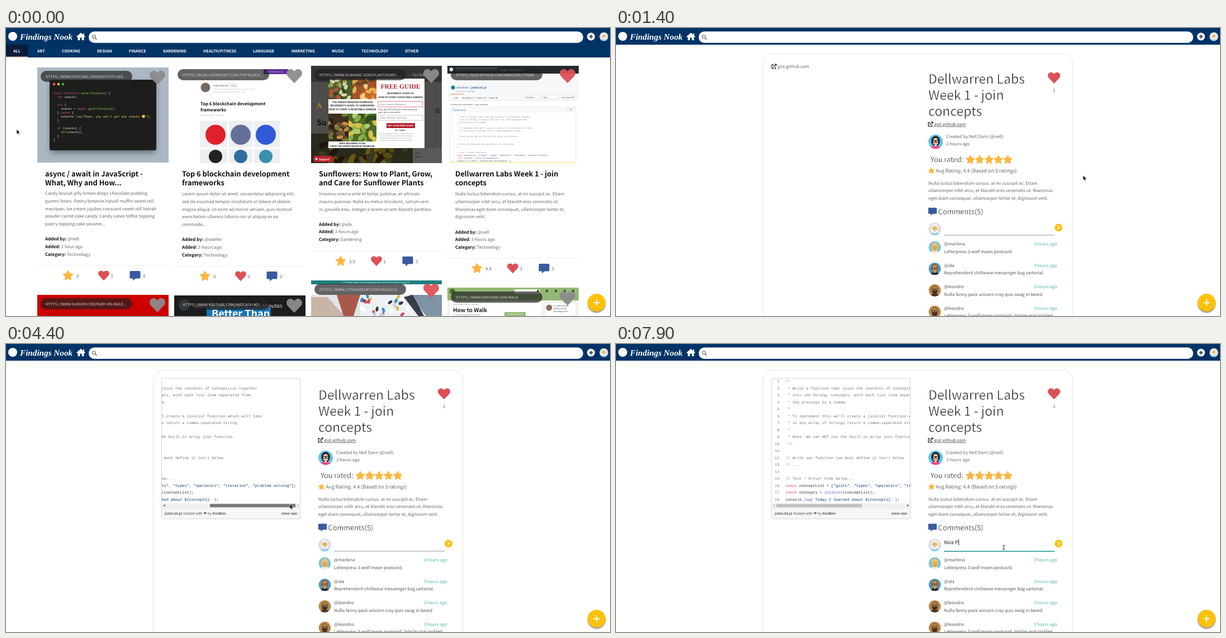
Write an HTML page that moves like this. It is 1081 by 518 pixels and loops after 8 s.

```html
<!DOCTYPE html>
<html lang="en">
<head>
<meta charset="utf-8">
<title>Findings Nook</title>
<style>
  html, body { margin: 0; width: 100%; height: 100%; overflow: hidden; background: #fff; }
  #stage { display: block; width: 100%; height: 100%; }
  text { font-family: "Noto Sans CJK JP", "Noto Sans CJK SC", "Noto Sans CJK", sans-serif;
         white-space: pre; text-rendering: geometricPrecision; }
  .mono { font-family: "Liberation Mono", monospace; }
  .sans { font-family: "Liberation Sans", sans-serif; }
  .serif { font-family: "Liberation Serif", serif; }
  .b { font-weight: 700; }
  .mid { text-anchor: middle; }
  .end { text-anchor: end; }
  .raised { filter: drop-shadow(0 2px .8px #0007); }
</style>
</head>
<body>
<svg id="stage" viewBox="0 0 1081 518"></svg>
<script>
const RED = '#dc5055', STAR = '#fdb63f', BLUE = '#3a5a9f', NAVY = '#003366', YELLOW = '#ffc107', SOFT = '#666';

// Drawing helpers; each returns SVG markup.
const rect = (x, y, w, h, fill, more = '') =>
  `<rect x="${x}" y="${y}" width="${w}" height="${h}" fill="${fill}" ${more}/>`;
const circle = (x, y, r, fill, more = '') => `<circle cx="${x}" cy="${y}" r="${r}" fill="${fill}" ${more}/>`;
const path = (d, fill, more = '') => `<path d="${d}" fill="${fill}" ${more}/>`;
const line = (d, color, width = 1) => path(d, 'none', `stroke="${color}" stroke-width="${width}"`);
const text = (x, y, s, size = 7.8, fill = SOFT, more = '') =>
  `<text x="${x}" y="${y}" font-size="${size}" fill="${fill}" ${more}>${s}</text>`;
const lines = (x, y, pitch, rows, ...style) => rows.map((s, i) => text(x, y + i * pitch, s, ...style)).join('');
const tint = (color, s) => `<tspan fill="${color}">${s}</tspan>`;
const group = (id, inner, more = '') => `<g id="${id}" ${more}>${inner}</g>`;
// A white outline over the glyphs thins the regular weight.
const thin = width => `stroke="#fff" stroke-width="${width}"`;

// A clipped box of scattered ovals, standing in for a busy photograph.
function scatter(x, y, w, h, [ground, ...colors], count, size) {
  let seed = x * 7 + y;
  const random = () => (seed = (seed * 16807 + 11) % 2147483647) / 2147483647;
  random();
  const ovals = Array.from({ length: count }, (_, i) => {
    const cx = (random() * w).toFixed(1), cy = (random() * h).toFixed(1), turn = Math.round(random() * 180);
    return `<ellipse rx="${size}" ry="${size * .55}" fill="${colors[i % colors.length]}" transform="translate(${cx} ${cy}) rotate(${turn})"/>`;
  });
  return `<svg x="${x}" y="${y}" width="${w}" height="${h}">${rect(0, 0, w, h, ground)}${ovals.join('')}</svg>`;
}

const heart = (x, y, r, fill, more = '') => path(
  'M0 .9L-.88-.02C-1.2-.42-.95-.95-.5-.95C-.25-.95-.1-.82 0-.66C.1-.82.25-.95.5-.95C.95-.95 1.2-.42.88-.02Z',
  fill, `transform="translate(${x} ${y}) scale(${r})" ${more}`);
const star = (x, y, r) => {
  const points = Array.from({ length: 10 }, (_, i) => {
    const a = i * Math.PI / 5, d = i % 2 ? r * .5 : r;
    return `${(x + d * Math.sin(a)).toFixed(2)},${(y - d * Math.cos(a)).toFixed(2)}`;
  });
  return `<polygon points="${points}" fill="${STAR}" stroke="${STAR}" stroke-width="${r / 6}" stroke-linejoin="round"/>`;
};
const bubble = (x, y, s) => path(
  'M-8-8.5H8Q9.5-8.5 9.5-7V3.5Q9.5 5 8 5H1L-4 9V5H-8Q-9.5 5-9.5 3.5V-7Q-9.5-8.5-8-8.5Z',
  BLUE, `transform="translate(${x} ${y}) scale(${s})"`);
const linkIcon = (x, y) =>
  line(`M${x + 4} ${y - 2.8}H${x + .6}V${y + 4}H${x + 7}V${y + 1}M${x + 3} ${y + 1.5}L${x + 8} ${y - 3.6}`, '#111', 1.2) +
  path(`M${x + 5.2} ${y - 4.5}H${x + 9}V${y - .7}Z`, '#111');
const plus = (x, y, r, color, width) => line(`M${x - r} ${y}H${x + r}M${x} ${y - r}V${y + r}`, color, width);

const avatar = (x, y, r, [bg, hair, skin, shirt, glasses, beard]) =>
  `<g transform="translate(${x} ${y}) scale(${r})" clip-path="url(#disc)">` +
  circle(0, 0, 1, bg) + `<ellipse cx="0" cy="-.08" rx=".6" ry=".72" fill="${hair}"/>` +
  `<ellipse cx="0" cy="1" rx=".75" ry=".45" fill="${shirt}"/>` + rect(-.15, .2, .3, .45, skin) +
  `<ellipse cx="0" cy="-.02" rx=".4" ry=".5" fill="${skin}"/>` +
  (beard ? path('M-.42.1Q0 .2.42.1Q.4.62 0 .65Q-.4.62-.42.1Z', beard) : '') +
  `<g fill="#fff6" stroke="${glasses}" stroke-width=".1"><circle cx="-.2" cy="-.05" r=".16"/><circle cx=".2" cy="-.05" r=".16"/></g>` +
  line('M-.12.32H.12', '#a33', .07) + '</g>';
const FACES = {
  me: ['#d9dde0', '#f5f5f2', '#f3c490', '#8fd3ec', '#d5a021', '#f7f7f4'],
  nell: ['#5cc6ee', '#2b1b24', '#f6d0b0', '#ff3f8e', '#333'],
  marlena: ['#6cc6ec', '#eec069', '#f2c27c', '#f4efe0', '#c58d2c', '#e9b458'],
  ida: ['#3f9bd0', '#a9652f', '#e0a36c', '#262626', '#1a1a1a'],
  leandro: ['#b78a4c', '#9b7034', '#c08a4d', '#4a3320', '#222', '#3a281b'],
};

// ---- Wall of cards ----
const TABS = { ALL: 13, ART: 56, COOKING: 100, DESIGN: 163, FINANCE: 220, GARDENING: 281, 'HEALTH/FITNESS': 353,
  LANGUAGE: 442, MARKETING: 511, MUSIC: 583, TECHNOLOGY: 636, OTHER: 714 };

const badge = (x, y, url, liked) =>
  rect(x + 6, y, 164, 20, '#222', 'rx="10" opacity=".7"') + text(x + 15, y + 12.6, url, 6.6, '#d4d4d4') +
  heart(x + 215, y + 13, 13.6, liked ? '#dd5357' : '#8c8c8c', 'opacity=".95"');

const card = (i, x, c) => {
  const meta = ['Added by:', 'Added:', 'Category:'].map((k, j) =>
    `<tspan class="b" fill="#111">${k}</tspan> ${c.meta[j]}`);
  const y = c.rule + 18.5;
  return rect(x, 68, 234, c.rule - 31, '#fff', `id="card${i}"`) + c.picture +
    badge(x, c.top, c.url, c.liked) +
    lines(x + 14, 266.6, 16, c.title, 12.8, '#111', 'class="b"') +
    lines(x + 14, c.bodyY, 13.6, c.body) +
    lines(x + 14, c.metaY, 13.6, meta, 7.8) +
    line(`M${x} ${c.rule}.5h234`, '#eee') +
    star(x + c.icons, y, 9) + text(x + c.icons + 15, y + 3, c.counts[0], 8) +
    heart(x + c.icons + 64, y, 9.6, RED) + text(x + c.icons + 76.5, y + 3, c.counts[1], 8) +
    bubble(x + c.icons + 120, y, 1) + text(x + c.icons + 134, y + 3, c.counts[2], 8);
};

const pink = s => tint('#e0559b', s), green = s => tint('#8fce5a', s);
const snackCode = rect(56, 71, 235, 171, '#abb8c3') + rect(80, 99, 187, 125, '#5c6975', 'rx="4" filter="url(#blur)"') +
  rect(78, 93, 191, 127, '#1d1e1b', 'rx="3"') +
  ['#ff5f56', '#ffbd2e', '#27c93f'].map((c, i) => circle(86 + i * 8, 101, 2.3, c)).join('') +
  lines(85, 119, 7, [
    `${pink('async function')} ${green('eatAllSnacks')}() {`, `  ${pink('let')} snacks;`, '', `  ${pink('try')} {`,
    `    snacks = ${pink('await')} ${green('getAllSnacks')}();`, `  } ${pink('catch')} {`,
    `    console.${green('log')}(${tint('#e6d874', '"Oops, you won\'t get any snacks   "')});`, '  }', '',
    `  ${pink('if')} (snacks) {`, `    ${green('eat')}(snacks);`, '  }', '}'],
    5.48, '#e8e8e8', 'class="mono"') + circle(246, 159, 2.7, '#f5c93d');

const chainArticle = rect(461, 74, 44, 9, '#5f2c9f') + text(464, 80, 'Open the free trial', 3.8, '#ddd') +
  circle(357, 107, 8.5, '#776a62') + text(371, 105, 'Oskar Brandel', 4, '#333') +
  rect(399, 100.5, 15, 5.5, '#fff', 'rx="2.5" stroke="#aaa" stroke-width=".5"') + text(402, 104.7, 'Follow', 3.2, '#555') +
  lines(371, 111, 4.5, ['I am a software engineer with over six years of work', 'in the field, and I build tools for the web.'], 3.1, '#aaa') +
  lines(348, 138.8, 11.2, ['Top 6 blockchain development', 'frameworks'], 7.75, '#111', 'class="b"') +
  text(348, 158, 'October 4, 2021 · 7 min read', 3.2, '#999') + rect(347, 167, 143, 76, '#eeeff2') +
  line('M397.5 167V243M442.5 167V243M347 216H490', '#fff', 3) +
  [['#e0202a', '#647099', '#2f5bd8'], ['#222', '#2f6f9f', '#3b8fae']].map((row, j) =>
    row.map((c, i) => circle(375 + i * 45, 192 + j * 39, j ? 12 : 18, c)).join('')).join('');

const gardenGuide = rect(546, 68, 234, 175, '#4e4d4b') + rect(546, 68, 234, 29, '#343434') +
  text(556, 144, 'A', 13, '#b58a1d', 'class="b serif"') + text(556, 175, 'Su', 14, '#111', 'class="b"') +
  text(722, 87, '– Iss besse', 8, '#aaa') + line('M768 146h8M768 149h8M768 152h8', '#151515') +
  scatter(546, 190, 182, 53, ['#29291c', '#6b5813', '#3a3a20', '#5a4a12', '#20170c'], 46, 9) +
  rect(728, 216, 52, 27, '#5a5a58') + lines(732, 226, 7, ['Start', 'Explore'], 4, '#222') +
  rect(577, 91, 172, 125, '#fff') +
  scatter(577, 91, 43, 37, ['#4b5b2c', '#8ea64e', '#2f421c', '#b9543a', '#d9d6b4'], 28, 5.5) +
  scatter(620, 91, 43, 37, ['#a4532a', '#e8b04c', '#cf6a2c', '#f0d489', '#6b4a25'], 24, 6.5) +
  scatter(577, 154, 36, 50, ['#40301f', '#6d5233', '#2b2118', '#c98d45', '#6f7d38'], 26, 6) +
  scatter(613, 154, 50, 50, ['#4c6a2a', '#8bac45', '#d8c04a', '#2f4a1c', '#b5cc6f'], 26, 8) +
  lines(620, 135, 6.3, ['THE GREEN MEADOW YEARBOOK', "BEGINNER'S GUIDE TO GARDENING", 'HOW TO START A VEGETABLE GARDEN'], 4.6, '#222', 'class="b mid"') +
  lines(620, 209, 5, ['FREE BEGINNER GUIDE', 'FROM THE GREEN MEADOW YEARBOOK'], 4.2, '#222', 'class="b mid"') +
  text(706, 109, 'FREE GUIDE', 11.5, '#b3202c', 'class="b serif mid"') +
  lines(706, 119, 6.5, ["BEGINNER'S GUIDE TO", 'HOW TO START A VEGETABLE GARDEN'], 4.3, '#222', 'class="b mid"') +
  rect(666, 132, 80, 10, '#fff', 'stroke="#c45" stroke-width=".7"') + text(669, 139, 'Email Address (Required)', 4, '#777') +
  lines(666, 148, 5, ['Plus, get 15% off your order when you', 'sign up for text alerts!'], 4, '#333') +
  rect(666, 157, 80, 9, '#fff', 'stroke="#aaa" stroke-width=".7"') + text(669, 163.4, 'Mobile Number (Optional)', 4, '#777') +
  rect(681, 171, 51, 9, '#b3202c') + text(706, 177.4, 'GET YOUR FREE GUIDE', 4.2, '#fff', 'class="b mid"') +
  text(706, 185, 'NO, THANKS', 3, '#333', 'class="b mid"') +
  lines(668, 191, 4, ['By submitting this form you agree to receive', 'recurring offers by text and email. Message',
    'and data rates may apply. You can opt out', 'at any time using the link in each message.'], 3, '#888') +
  rect(550, 230, 35, 11, '#b8242b', 'rx="4"') + text(560, 237.5, 'Support', 4.8, '#fff', 'class="b"') + circle(555.5, 235.5, 2, '#fff');

const joinCode = [
  '/*', ' * Write a function that joins the contents of conceptList together',
  ' * into one String, concepts, with each list item separated from', ' * the previous by a comma.', ' *',
  " * To implement this we'll create a joinList function which will take",
  ' * in any array of strings return a comma-separated string.', ' *',
  ' * Note: We can NOT use the built-in Array join function.', ' */', '',
  '// Write our function (we must define it too!) below', '// ...', '', '// Test / Driver Code below...',
  `${tint('#d73a49', 'const')} ${tint('#24292e', 'conceptList = [')}${tint('#032f62', '"gists"')}, ` +
    tint('#032f62', '"types", "operators", "iteration", "problem solving"') + tint('#24292e', '];'),
  `${tint('#d73a49', 'const')} ${tint('#24292e', 'concepts =')} ${tint('#6f42c1', 'joinList')}${tint('#24292e', '(conceptList);')}`,
  tint('#24292e', `console.${tint('#6f42c1', 'log')}(${tint('#032f62', '`Today I learned about ${concepts}.`')});`)];

const gistPage = rect(790, 68, 235, 14, '#24292e') + circle(797, 74.5, 3.2, '#fff') + rect(805, 71, 74, 7, '#3f4448') +
  text(885, 76.5, 'All gists   Back to host', 3.8, '#ddd', 'class="b"') +
  rect(790, 82, 235, 48, '#f6f8fa') + circle(800, 107, 3.6, '#1d7c8c') +
  text(806, 109, 'mbolten / <tspan class="b">joinList.js</tspan>', 5.6, '#2b5f9e') + text(806, 115, 'Last active 2 years ago', 3.2, '#888') +
  rect(795, 119, 24, 11, '#fff', 'stroke="#ddd" stroke-width=".5"') + rect(795, 118.5, 24, 1, '#f9826c') +
  text(800, 126.5, 'Code   ◦ Revisions  1   ☆ Stars  17   ⑂ Forks  38', 3.8, '#444') +
  ['Embed ▾', 'Raw', 'Download ZIP'].map((s, i) => rect(927 + i * 32, 121, 28, 6.5, '#fff', 'rx="1" stroke="#ccc" stroke-width=".5"') +
    text(930 + i * 32, 126, s, 3.6, '#444')).join('') +
  line('M790 130.5H1025', '#ddd', .6) + text(796, 138.5, 'Dellwarren Labs Week 1 - join concepts', 3.7, '#444') +
  rect(795, 142, 225, 99, '#fff', 'stroke="#ddd" stroke-width=".7"') + rect(795.5, 142.5, 224, 9.5, '#f6f8fa') +
  text(799, 149, '▤ joinList.js', 4.2, '#2b5f9e') + rect(1005, 144, 12, 6, '#fff', 'stroke="#ccc" stroke-width=".5"') +
  text(1011, 148.4, 'Raw', 3.2, '#444', 'class="mid"') +
  lines(807, 156.5, 4.9, joinCode, 3.25, '#6a737d', 'class="mono"') +
  lines(799, 156.5, 4.9, joinCode.map((_, i) => i + 1), 2.6, '#ccc', 'class="mono"') + rect(795, 240.5, 225, 2.5, '#faf3bd');

const CARDS = [
  { picture: snackCode, top: 77, url: 'HTTPS://WWW.YOUTUBE.COM/WATCH?V=568…', title: ['async / await in JavaScript -', 'What, Why and How...'],
    body: ['Candy biscuit jelly lemon drops chocolate pudding', 'gummi bears. Pastry brownie halvah muffin sweet roll',
      'marzipan. Ice cream jujubes croissant sweet roll halvah', 'powder carrot cake candy. Candy canes toffee topping', 'pastry topping cake sesame...'],
    bodyY: 300.3, meta: ['@nell', '1 hour ago', 'Technology'], metaY: 382.3, rule: 427, icons: 55, counts: ['0', '1', '0'] },
  { picture: chainArticle, top: 74, url: 'HTTPS://BLOG.LOGROCKET.COM/TOP-BLOCK…', title: ['Top 6 blockchain development', 'frameworks'],
    body: ['Lorem ipsum dolor sit amet, consectetur adipiscing elit,', 'sed do eiusmod tempor incididunt ut labore et dolore',
      'magna aliqua. Ut enim ad minim veniam, quis nostrud', 'exercitation ullamco laboris nisi ut aliquip ex ea', 'commodo...'],
    bodyY: 301.3, meta: ['@odette', '3 hours ago', 'Technology'], metaY: 383.3, rule: 428, icons: 55, counts: ['0', '0', '0'] },
  { picture: gardenGuide, top: 74, url: 'HTTPS://WWW.ALMANAC.COM/PLANT/SUNFL…', title: ['Sunflowers: How to Plant, Grow,', 'and Care for Sunflower Plants'],
    body: ['Vivamus viverra ante et tortor pulvinar, et ultricies', 'mauris pulvinar. Nulla eu metus tincidunt, rutrum sem',
      'in, gravida eros. Integer a lorem ut sem blandit porttitor.'],
    bodyY: 301.3, meta: ['@ida', '3 hours ago', 'Gardening'], metaY: 355.8, rule: 401, icons: 53, counts: ['3.0', '1', '3'] },
  { picture: gistPage, top: 74, liked: true, url: 'HTTPS://GIST.GITHUB.COM/MBOLTEN/7F98A6…', title: ['Dellwarren Labs Week 1 - join', 'concepts'],
    body: ['Nulla luctus bibendum cursus. at mi suscipit ac. Etiam', 'ullamcorper nibh arcu, et blandit eros venenatis ut.',
      'Maecenas eget diam consequat, ullamcorper tortor et,', 'dignissim velit.'],
    bodyY: 301.3, meta: ['@nell', '3 hours ago', 'Technology'], metaY: 369.8, rule: 414, icons: 53, counts: ['4.4', '3', '5'] },
];
const CARD_X = [56, 301, 546, 790];

const nextRow =
  rect(56, 480, 235, 38, '#cc0000') + badge(56, 486, 'HTTPS://WWW.GURU99.COM/RUBY-ON-RAILS…') +
  rect(301, 481, 235, 37, '#1c1c1c') + rect(359, 503, 115, 15, '#1775b5') + text(368, 520, 'Better Than', 18, '#fff', 'class="b"') +
  circle(319, 498, 10, '#526b80') + text(336, 503, 'Learn Regexp Observer in 5 Minutes', 9.6, '#ddd') +
  [494, 499, 504].map(y => circle(515, y, 1.3, '#ddd')).join('') + badge(301, 487, 'HTTPS://WWW.YOUTUBE.COM/WATCH?V=M2…') +
  rect(546, 454, 234, 7, '#1f7f80') + text(663, 459.3, '📦 Please expect some shipping delays due to the holiday season 📦', 3.8, '#fff', 'class="mid"') +
  rect(546, 461, 234, 19, '#fff') + rect(546, 480, 234, 38, '#dfe5ea') +
  path('M546 518V484H575L606 518Z', '#c9b5a5') + path('M592 480H634L622 518H604Z', '#a8594c') +
  scatter(634, 480, 100, 38, ['#edf1f4', '#fff', '#c3d3df', '#d24a63', '#fff', '#3a8fc0', '#3b3447', '#e2b544'], 34, 4.5) +
  path('M722 480H780V518H752Z', '#7e93a6') + path('M712 484L728 480L748 518H738Z', '#3a3a48') +
  badge(546, 460, 'HTTPS://WWW.LETSMAKEART.COM/PAGES/LE…', true) +
  rect(790, 467, 235, 23, '#93b874') + circle(799, 474, 5, '#4c6b34') + rect(910, 470, 45, 8, '#fff') +
  [952, 968, 984, 1000, 1015].map(x => circle(x, 473, 2.2, '#37502a')).join('') +
  rect(790, 490, 235, 28, '#f4f4ef') + rect(795, 490, 163, 28, '#fff') + text(800, 498, 'SPORTS AND FITNESS » WALKING', 3, '#6a8f50') +
  text(800, 511, 'How to Walk', 10, '#222', 'class="b"') + text(800, 517, 'Co-authored by Milena Dorvik', 3.5, '#777') +
  rect(892, 511, 38, 7, '#93b874') + text(896, 516, 'Download Article', 3.8, '#fff') +
  rect(964, 494, 56, 24, '#fff', 'stroke="#ddd" stroke-width=".6"') + circle(972, 503, 5.5, '#8d6f5c') +
  lines(980, 501, 5, ['Co-authored by:', 'Milena Dorvik', 'Running Coach'], 3.6, '#333') +
  badge(790, 474, 'HTTPS://WWW.WIKIHOW.COM/WALK');

const wall = CARDS.map((c, i) => card(i, CARD_X[i], c)).join('') + nextRow +
  rect(0, 29, 1081, 24, NAVY) + rect(0, 30, 39, 23, '#0b1b3c') + rect(0, 51.5, 39, 1.5, '#f3c3c0') +
  Object.entries(TABS).map(([name, x]) => text(x, 44.3, name, 7.1, '#fff', 'class="b"')).join('');

// ---- Detail page ----
const COMMENTS = [
  ['marlena', 'Letterpress 3 wolf moon postcard.'], ['ida', 'Reprehenderit chillwave messenger bag sartorial.'],
  ['leandro', 'Nulla fanny pack unicorn cray quis swag in beard'], ['leandro', 'Letterpress 3 wolf moon postcard, listicle viral pickled'],
];

const gist = rect(278.5, 61.5, 248, 253, '#fff', 'rx="2.5" stroke="#d5d5d5"') +
  '<g clip-path="url(#codeView)">' + group('code',
    lines(292.5, 69.4, 12.5, joinCode.map((_, i) => i + 1), 6.8, '#777', 'class="mono end"') +
    lines(303.5, 69.4, 12.5, joinCode, 6.8, '#6a737d', 'class="mono"')) + '</g>' +
  rect(279, 286.5, 247, 8.5, '#f1f1f1') + rect(287, 287.6, 153, 6, '#c1c1c1', 'id="thumb"') +
  path('M281.5 290.5l3-2v4z', '#aaa', 'id="leftArrow"') + path('M524 290.5l-3-2v4z', '#444', 'id="rightArrow"') +
  rect(279, 295, 247, 19, '#f7f7f7') + line('M279 295.2H526', '#ddd', .6) +
  text(284, 307.2, '<tspan class="b">joinList.js</tspan> hosted with ❤ by <tspan class="b">Kodbin</tspan>', 6.76, '#555', 'class="sans"') +
  text(521, 307.2, 'view raw', 6.76, '#555', 'class="sans b end"');

const detail = rect(263.5, 46.5, 554, 520, '#fff', 'rx="18" stroke="#e6e6e6"') +
  group('bareLink', linkIcon(278.5, 69) + text(289, 72, 'gist.github.com')) + group('gist', gist) +
  lines(559, 100, 29.2, ['Dellwarren Labs', 'Week 1 - join', 'concepts'], 23, '#1c1c1c', thin(.6)) +
  heart(784, 90, 10.8, RED) + text(784, 115, '3', 7.8, SOFT, 'class="mid"') +
  linkIcon(558.5, 173) + text(567.5, 176, ' gist.github.com', 7.8, '#444', 'text-decoration="underline"') +
  avatar(572, 204.5, 13, FACES.nell) + lines(591, 197.8, 13.6, ['Created by Nell Dorn (@nell)', '3 hours ago']) +
  text(563, 241.2, 'You rated:', 12.6, '#222', thin(.3)) +
  [0, 1, 2, 3, 4].map(i => star(634 + i * 16.8, 237, 7.9)).join('') +
  star(564.5, 257, 5.6) + text(572.5, 260, 'Avg Rating: 4.4 (Based on 5 ratings)', 8.95, '#444', thin(.15)) +
  lines(559, 281.8, 13.6, ['Nulla luctus bibendum cursus. at mi suscipit ac. Etiam',
    'ullamcorper nibh arcu, et blandit eros venenatis ut. Maecenas', 'eget diam consequat, ullamcorper tortor et, dignissim velit.']) +
  bubble(566.5, 330, .8) + text(576.5, 335, 'Comments(5)', 12.8, '#222', thin(.3)) +
  avatar(570.5, 361.5, 11.5, FACES.me) + rect(587, 372, 198, 1, '#9e9e9e', 'id="underline"') +
  text(587, 360, '', 8.75, '#111', 'id="typed"') + rect(587.5, 351, 1, 11, '#222', 'id="caret"') +
  circle(792, 359, 7, YELLOW) + line('M790.3 355.5L793.8 359L790.3 362.5', '#fff', 1.6) +
  COMMENTS.map(([name, words], i) => {
    const y = 391 + i * 38.6;
    return avatar(570.5, y + 3.5, 11, FACES[name]) + text(587, y, '@' + name, 7.8, '#555') +
      text(789.5, y, '3 hours ago', 7.8, '#4db6ac', 'class="end"') + text(587, y + 13.6, words, 7.8, '#555');
  }).join('');

// ---- Shared chrome ----
const navbar = rect(0, 0, 1081, 30, NAVY) + circle(12, 15, 8, '#fff') +
  text(25, 20.5, 'Findings Nook', 15.2, '#fff', 'class="serif b" font-style="italic"') +
  path('M134 8.5L126 15.5L127.2 16.8L128.5 15.8V22H132.3V17.5H135.7V22H139.5V15.8L140.8 16.8L142 15.5L140 13.7V9.8H138V12Z', '#fff') +
  rect(148, 6.2, 885, 20.5, '#fff', 'rx="10"') + circle(157.3, 15.8, 2.8, 'none', 'stroke="#888" stroke-width="1.5"') +
  line('M159.5 18L162.5 21', '#888', 1.8) + circle(1047, 15.5, 7, '#fff') + plus(1047, 15.5, 3.5, '#123', 1.6) +
  avatar(1070, 15.5, 8, FACES.me);
const addButton = circle(1057, 494, 16, YELLOW, 'class="raised"') + plus(1057, 494, 5.5, '#fff', 2);

const pointers =
  group('arrow', path('M0 0V9L2.1 7.1L3.6 10.3L5.1 9.6L3.7 6.6H6.4Z', '#111', 'stroke="#fff" stroke-width=".6"')) +
  group('hand', path('M-.8 .5Q0-.5 .8 .5V4L4.4 5Q5.2 5.5 4.8 7.5L4 10H-.8L-3.2 6.5Q-3 5.2-.8 6.5Z', '#fff', 'stroke="#111" stroke-width=".8"')) +
  group('beam', line('M-2-4Q0-4 0-3Q0-4 2-4M0-3.5V3.5M-2 4Q0 4 0 3Q0 4 2 4', '#222', 1));

const stage = document.getElementById('stage');
stage.innerHTML = `<defs>
  <clipPath id="disc"><circle r="1"/></clipPath>
  <clipPath id="codeView"><rect x="279" y="62" width="247" height="224"/></clipPath>
  <filter id="blur" x="-20%" y="-20%" width="140%" height="140%"><feGaussianBlur stdDeviation="6"/></filter></defs>` +
  group('wall', wall) + group('detail', detail) + group('nav', navbar) + addButton + group('pointer', pointers);

const $ = id => document.getElementById(id);
const show = (id, on) => $(id).setAttribute('display', on ? 'inline' : 'none');

// ---- Timeline ----
const LOOP = 8000, TICK = 100;
const MOVES = [[0, 19, 182], [800, 837, 263], [1100, 837, 263], [1200, 836, 265], [3000, 836, 265], [3100, 735, 251],
  [3800, 430, 288], [3900, 430, 288], [4400, 508, 288], [4600, 508, 288], [5000, 430, 288], [5500, 694, 366], [LOOP, 694, 366]];
const TYPING = [[6900, 'N'], [7100, 'Ni'], [7300, 'Nice'], [7600, 'Nice '], [7900, 'Nice P']];

function pointerAt(t) {
  const i = MOVES.findIndex(([end]) => t < end);
  const [t0, x0, y0] = MOVES[i - 1], [t1, x1, y1] = MOVES[i];
  const p = (t - t0) / (t1 - t0), e = p * p * (3 - 2 * p);
  return [x0 + (x1 - x0) * e, y0 + (y1 - y0) * e];
}

function draw(now) {
  const t = Math.floor(now % LOOP / TICK) * TICK;
  const [x, y] = pointerAt(t), onWall = t < 1200, loaded = t >= 1900;
  show('wall', onWall);
  show('detail', !onWall);
  show('bareLink', !loaded);
  show('gist', loaded);

  CARD_X.forEach((left, i) => $('card' + i).classList.toggle('raised', onWall && x > left && x < left + 234));

  const dragging = t >= 3900 && t < 5000, drag = dragging ? x - 430 : 0;
  $('thumb').setAttribute('x', 287 + drag);
  $('thumb').setAttribute('fill', dragging ? '#787878' : t === 3800 || t === 5000 ? '#a8a8a8' : '#c1c1c1');
  $('code').setAttribute('transform', `translate(${-drag * 127 / 78} 0)`);
  $('leftArrow').setAttribute('fill', drag > 1 ? '#444' : '#aaa');
  $('rightArrow').setAttribute('fill', drag > 77 ? '#aaa' : '#444');

  const focus = Math.min(1, Math.max(0, (t - 5500) / 400));
  $('underline').setAttribute('fill', `rgb(${158 - 120 * focus},${158 - 4 * focus},${158 - 15 * focus})`);
  $('underline').setAttribute('height', 1 + focus * .6);
  const typed = TYPING.filter(([start]) => t >= start).pop();
  $('typed').textContent = typed ? typed[1] : '';
  $('caret').setAttribute('x', 587.5 + (typed ? $('typed').getComputedTextLength() : 0));
  show('caret', t >= 5600 && t < 6400 || t >= 6900);

  $('pointer').setAttribute('transform', `translate(${x} ${y})`);
  const hand = t >= 800 && onWall, beam = t >= 5500;
  show('hand', hand);
  show('beam', beam);
  show('arrow', !hand && !beam);
  requestAnimationFrame(draw);
}
draw(0);
</script>
</body>
</html>
```
